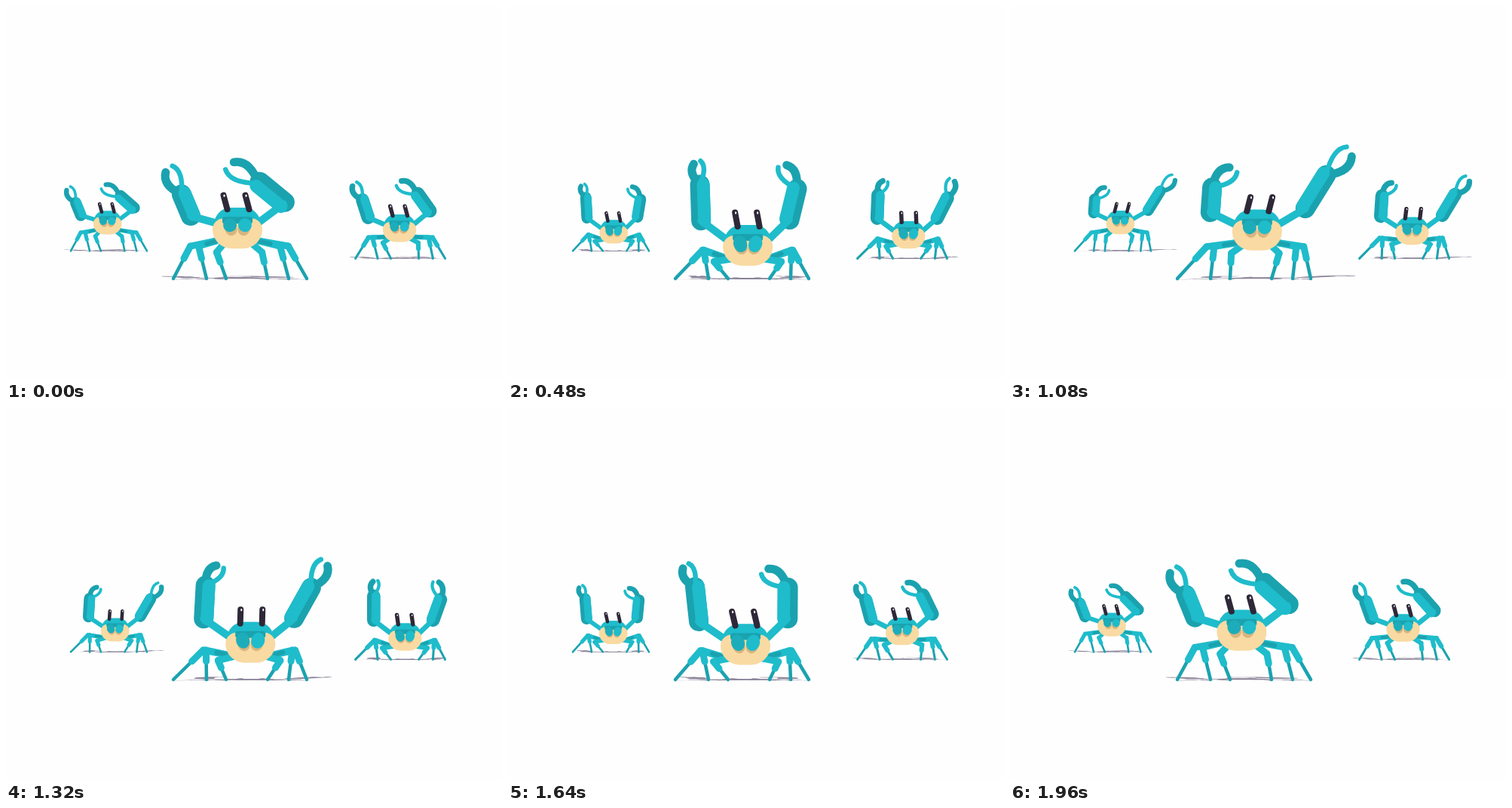
Animation of 658x494 px, one loop 2000 ms. Source, as an HTML page with a canvas:

```html
<!DOCTYPE html>
<html>
<head>
<meta charset="utf-8">
<style>
html, body { margin: 0; width: 100%; height: 100%; overflow: hidden; background: #fefefe; }
canvas { display: block; }
</style>
</head>
<body>
<canvas id="stage" width="658" height="494"></canvas>
<script>
const ctx = document.getElementById('stage').getContext('2d');
const LIGHT = '#1fbccb', DARK = '#1ba2af', CREAM = '#f9daa2', TAN = '#d8b57f', EYE = '#2e2838', SHADE = '#8a8398';
const GROUND = 362, ANCHOR = 399, LOOP = 2000, STEP = 40;

const CRABS = [
  { foot: 187, ground: 325, scale: .571, delay: 45 },
  { foot: 582.5, ground: 335, scale: .672, delay: -150 },
  { foot: ANCHOR, ground: GROUND, scale: 1, delay: 10 }];

// Leg pairs, back to front; splay and drop move the knee when crouching.
const LEGS = [
  { feet: [222, 399], hip: 29, knee: 65, kneeY: 318, splay: -5, drop: 5 },
  { feet: [266, 375], hip: 28, knee: 54, kneeY: 318, splay: 4, drop: 5, shaded: true },
  { feet: [292, 347], hip: 15, knee: 30, kneeY: 326, splay: 14, drop: 12 }];

let tint = null;
const paint = c => tint || c;
const between = (p, q, k) => [p[0] + (q[0] - p[0]) * k, p[1] + (q[1] - p[1]) * k];

// Point at a distance from p, angle in degrees clockwise from straight up.
function toward([x, y], deg, len) {
  const a = deg * Math.PI / 180;
  return [x + Math.sin(a) * len, y - Math.cos(a) * len];
}

function smooth(k) {
  k = Math.min(Math.max(k, 0), 1);
  return k * k * (3 - 2 * k);
}

// Curve from a to b that passes through m.
function arc(color, width, a, m, b) {
  ctx.strokeStyle = paint(color);
  ctx.lineWidth = width;
  ctx.beginPath();
  ctx.moveTo(...a);
  ctx.quadraticCurveTo(2 * m[0] - (a[0] + b[0]) / 2, 2 * m[1] - (a[1] + b[1]) / 2, ...b);
  ctx.stroke();
}

const line = (color, width, a, b) => arc(color, width, a, between(a, b, .5), b);

function oval(color, x, y, rx, ry, turn = 0) {
  ctx.fillStyle = paint(color);
  ctx.beginPath();
  ctx.ellipse(x, y, rx, ry, turn, 0, 7);
  ctx.fill();
}

function box(color, x, y, w, h, radii) {
  ctx.fillStyle = paint(color);
  ctx.beginPath();
  ctx.roundRect(x, y, w, h, radii);
  ctx.fill();
}

function leg(pair, side, { x, y, sway, low }) {
  const hip = [x + side * pair.hip, y + 15];
  const foot = [pair.feet[side < 0 ? 0 : 1], 361];
  const knee = [309.5 + 16 * sway + side * (pair.knee + pair.splay * low), pair.kneeY + pair.drop * low];
  const ankle = between(knee, foot, .38);
  line(DARK, 4.5, ankle, foot);
  line(LIGHT, 9, hip, knee);
  if (pair.shaded) line(DARK, 6, hip, between(hip, knee, .55));
  line(LIGHT, 9, knee, ankle);
}

function arm(side, { x, y, sway, low }) {
  const left = side < 0, back = (1 - sway) ** 2, flip = smooth((sway - .3) / .7);
  const shoulder = [x + side * 26, y - 8];
  const elbow = left
    ? [x - 62, y - 18 - 6 * sway - 13 * low]
    : [x + 61 + 4 * sway - 8 * low, y - 34 + 4 * sway - 4 * low];
  const tilt = left ? 4 - 27 * back : 32 - 83 * back;
  const wrist = toward(elbow, tilt, left ? 31 + 16 * low : 43 + 10 * sway - 6 * low);
  const claw = left ? -36 + 77 * flip : -49 + 103 * flip;
  const reach = (left ? 36 : 43) * (1 - .2 * low);
  const claws = (turn, k) => toward(wrist, claw - side * turn, reach * k);
  const shift = (p, d) => toward(p, tilt + 90, side * d);
  const bulge = left ? 0 : 3 * back;

  arc(DARK, 11, wrist, claws(-18, .62), claws(0, 1));
  line(DARK, 26, shift(elbow, bulge), shift(wrist, bulge));
  line(LIGHT, 10, shoulder, elbow);
  arc(LIGHT, 6.5, wrist, claws(32, .7), claws(18, 1.1));
  line(LIGHT, 17, shift(elbow, -4.5), shift(wrist, -4.5));
}

function face({ x, y, sway, low }) {
  ctx.save();
  ctx.translate(x, y);
  box(LIGHT, -31, -29, 62, 40, [22, 22, 16, 16]);
  box(CREAM, -33, -15, 66, 40, [17, 17, 29, 29]);
  box(LIGHT, -21, -29, 42, 14, [13, 13, 0, 0]);
  const lean = -5 + 10 * sway ** 3, mouth = -6 + 2 * low;
  for (const side of [-1, 1]) {
    const ex = 1 + side * 14.5;
    line(EYE, 8, [ex + lean, -45.5], [ex, -27]);
    oval('#fff', ex + lean + 1, -45, 1.1, 1.8);
    oval(TAN, side * 8.5, mouth + 5, 8, 9, side * .3);
  }
  box(DARK, -20, -17, 40, 9, 3);
  for (const side of [-1, 1])
    oval(side < 0 ? '#1dadba' : LIGHT, side * 10, mouth, 9, 9 + 2 * low, side * .3);
  ctx.restore();
}

// s runs from far left (0) to far right (1); the body crouches in between.
function figure(s) {
  const sway = Math.sin(Math.PI * s / 2) ** 1.6;
  const low = 1.05 * Math.sin(Math.PI * s) ** 1.4;
  const pose = { x: 307 + 21 * sway, y: 296 + 22 * low, sway, low };
  for (const pair of LEGS) for (const side of [-1, 1]) leg(pair, side, pose);
  for (const side of [-1, 1]) arm(side, pose);
  face(pose);
}

function crab({ foot, ground, scale, delay }, time) {
  const phase = (time - delay + LOOP) % LOOP / 1000;
  const s = phase > 1 ? 2 - phase : phase;
  ctx.save();
  ctx.translate(foot, ground);
  ctx.scale(scale, scale);
  ctx.translate(-ANCHOR, -GROUND);
  // The ground shadow is the flattened silhouette.
  ctx.save();
  ctx.translate(0, GROUND + .5);
  ctx.scale(1, .033);
  ctx.translate(0, -GROUND);
  tint = SHADE;
  figure(s);
  tint = null;
  ctx.restore();
  figure(s);
  ctx.restore();
}

function frame() {
  const time = Math.floor(performance.now() / STEP) * STEP % LOOP;
  ctx.fillStyle = '#fefefe';
  ctx.fillRect(0, 0, 658, 494);
  ctx.lineCap = ctx.lineJoin = 'round';
  CRABS.forEach(c => crab(c, time));
  requestAnimationFrame(frame);
}
frame();
</script>
</body>
</html>
```
